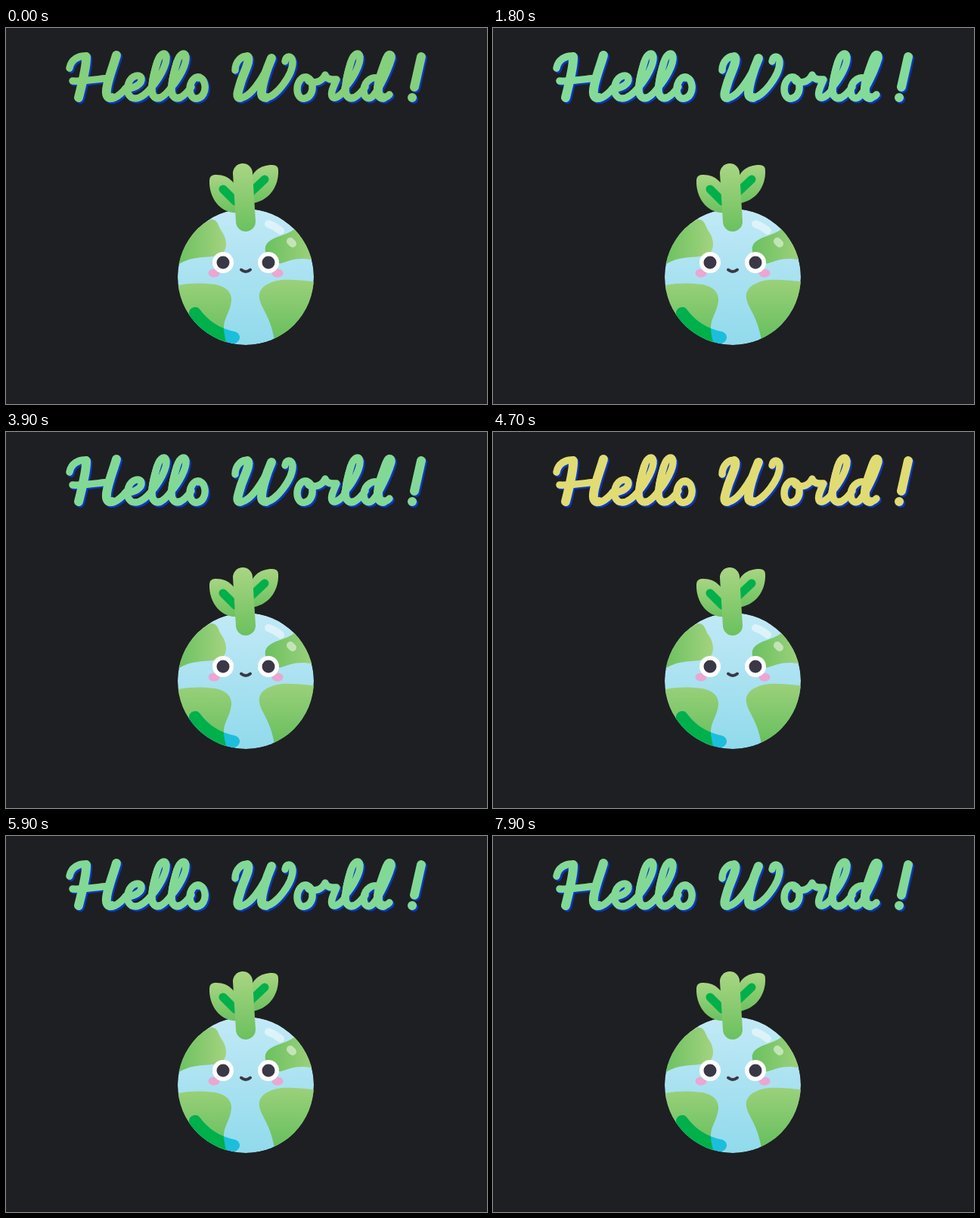
An HTML page that plays this animation: 636x497 px, repeating every 8 s.

```html
<!DOCTYPE html>
<html lang="en">
<head>
<meta charset="utf-8">
<title>Hello World !</title>
<style>
  html, body { margin: 0; width: 100%; height: 100%; overflow: hidden; background: #1e1f22; }
  svg { display: block; width: 636px; height: 497px; }
  .line { fill: none; stroke-linecap: round; stroke-linejoin: round; }
  #word { stroke-width: 9.5; }
  #word .down { stroke-width: 12; }
  .vein { stroke: #00b04a; stroke-width: 11; }
</style>
</head>
<body>
<svg viewBox="0 0 636 497" role="img" aria-label="Hello World !">
  <defs>
    <linearGradient id="water" x2="0" y2="1">
      <stop stop-color="#c2e9f6"/><stop offset="1" stop-color="#90daec"/>
    </linearGradient>
    <linearGradient id="leaf" x2="0" y2="1">
      <stop stop-color="#a9d582"/><stop offset="1" stop-color="#6bc15f"/>
    </linearGradient>
    <linearGradient id="south" gradientUnits="userSpaceOnUse" x1="0" y1="336" x2="0" y2="412">
      <stop stop-color="#99d079"/><stop offset="1" stop-color="#66bf5d"/>
    </linearGradient>
    <linearGradient id="stalk" gradientUnits="userSpaceOnUse" x1="313" y1="180" x2="317" y2="268">
      <stop stop-color="#a9d582"/><stop offset="1" stop-color="#6bc15f"/>
    </linearGradient>
    <linearGradient id="side">
      <stop stop-color="#6bc15f"/><stop offset="1" stop-color="#a4d37f"/>
    </linearGradient>
    <clipPath id="globe"><circle cx="317" cy="329" r="90"/></clipPath>
    <path id="southwest" d="M220 342C240 336 262 337 277 339C291 342 299 349 298 361C296 377 287 384 288 399Q289 410 294 425H220Z"/>
    <clipPath id="land"><use href="#southwest"/></clipPath>

    <g id="ell">
      <path d="M192 79C203 67 213 48 212 38C211 31 204 33 200 45C196 58 192 74 193 84C194 93 201 95 206 91C211 88 216 82 219 78"/>
      <path class="down" d="M200 45C196 58 192 74 193 84C194 91 198 93 202 92"/>
    </g>
    <path id="oh" d="M256 65C249 63 243 72 243 81C243 90 248 94 253 93C260 92 264 84 263 76C262 69 259 65 254 66"/>

    <g id="word" class="line">
      <!-- H -->
      <path d="M84 53C86 42 96 36 106 37M88 70C100 71 118 68 137 66"/>
      <path class="down" d="M106 38C107 50 100 76 96 92M146 36C142 50 134 70 133 82C132 91 136 93 140 92"/>
      <path d="M133 82C132 92 138 95 144 92C150 89 155 84 159 79"/>
      <!-- e -->
      <path d="M158 80C170 80 180 74 179 67C178 60 166 62 162 73C158 85 163 93 171 93C179 93 186 86 192 79"/>
      <use href="#ell"/>
      <use href="#ell" x="26"/>
      <use href="#oh"/>
      <!-- W -->
      <path d="M303 56C303 44 312 36 319 38M310 92C322 93 341 66 350 42M344 92C356 92 380 62 379 44C378 36 370 36 369 44"/>
      <path class="down" d="M319 38C324 41 316 56 311 70C306 86 304 92 310 92M351 40C343 58 338 78 338 86C338 91 341 92 344 92"/>
      <use href="#oh" x="142"/>
      <!-- r -->
      <path d="M400 70C410 74 418 70 422 62C424 69 432 68 437 68C434 76 429 84 431 90C433 95 442 91 449 80"/>
      <use href="#ell" x="256"/>
      <!-- d -->
      <path d="M493 68C487 62 474 69 473 82C473 94 481 95 486 89C494 80 506 54 510 40C511 33 505 33 503 39C497 55 491 74 492 84C493 94 501 94 507 88"/>
      <path class="down" d="M503 42C497 58 491 74 492 84C493 91 496 92 499 92"/>
      <!-- ! -->
      <path class="down" d="M549 38L540 78M537 92h.1"/>
    </g>
  </defs>

  <rect width="636" height="497" fill="#1e1f22"/>

  <use href="#word" x="2" y="2" stroke="#0838c8"/>
  <use id="title" href="#word"/>

  <g clip-path="url(#globe)">
    <circle cx="317" cy="329" r="90" fill="url(#water)"/>
    <path fill="url(#side)" d="M227 258H262L271 253C281 253 280 262 286 270C292 279 293 291 287 297C277 305 257 301 242 306Q233 309 227 313Z"/>
    <path fill="url(#side)" d="M385 262C374 276 348 274 343 289C341 302 350 313 364 311C377 307 388 301 415 309V262Z"/>
    <use href="#southwest" fill="url(#south)"/>
    <path fill="url(#south)" d="M415 336C395 334 372 331 358 334C341 338 333 347 335 357C337 371 352 383 356 420H415Z"/>
    <g class="line" stroke-width="16">
      <path id="shade" d="M250 377A82 82 0 0 0 301 409" stroke="#1bbfdb"/>
      <g clip-path="url(#land)"><path d="M250 377A82 82 0 0 0 301 409" stroke="#00b04a"/></g>
    </g>
  </g>
  <path class="line" d="M347 259Q356 262 363 268M376 282L379 285" stroke="#fff" stroke-opacity=".5" stroke-width="10"/>

  <path fill="url(#leaf)" d="M307 244C283 246 268 224 269 201Q269 195 276 194C294 193 306 205 307 222Z"/>
  <path fill="url(#leaf)" d="M323 232C347 230 361 210 360 188Q360 181 352 181C336 181 324 190 323 206Z"/>
  <path class="line vein" d="M287 213L303 229M342 200L324 217"/>
  <path class="line" d="M313 192L317 256" stroke="url(#stalk)" stroke-width="26"/>

  <g fill="#eba6d2">
    <ellipse cx="275" cy="324" rx="7.5" ry="5.5"/>
    <ellipse cx="359" cy="324" rx="7.5" ry="5.5"/>
  </g>
  <g fill="#fff"><circle cx="287" cy="310" r="14"/><circle cx="347" cy="310" r="14"/></g>
  <g fill="#3a3847"><circle cx="287" cy="310" r="8.5"/><circle cx="347" cy="310" r="8.5"/></g>
  <path class="line" d="M311 319.5Q317 324.5 323 319.5" stroke="#3a3847" stroke-width="4"/>
</svg>
<script>
  const PERIOD = 2000, STEP = 100;
  // time in ms, then red, green, blue
  const stops = [
    [0, 132, 208, 125], [300, 168, 213, 120], [700, 224, 220, 115],
    [900, 240, 224, 115], [1000, 243, 225, 116], [1300, 200, 222, 125],
    [1600, 135, 222, 160], [1900, 130, 217, 150], [2000, 132, 208, 125]
  ];
  const title = document.getElementById('title');

  function colorAt(t) {
    const i = stops.findIndex(s => s[0] > t);
    const a = stops[i - 1], b = stops[i];
    const p = (t - a[0]) / (b[0] - a[0]);
    return `rgb(${[1, 2, 3].map(k => Math.round(a[k] + (b[k] - a[k]) * p))})`;
  }

  const start = performance.now();
  function draw() {
    const t = Math.max(0, performance.now() - start) % PERIOD;
    title.style.stroke = colorAt(Math.floor(t / STEP) * STEP);
    requestAnimationFrame(draw);
  }
  draw();
</script>
</body>
</html>
```
